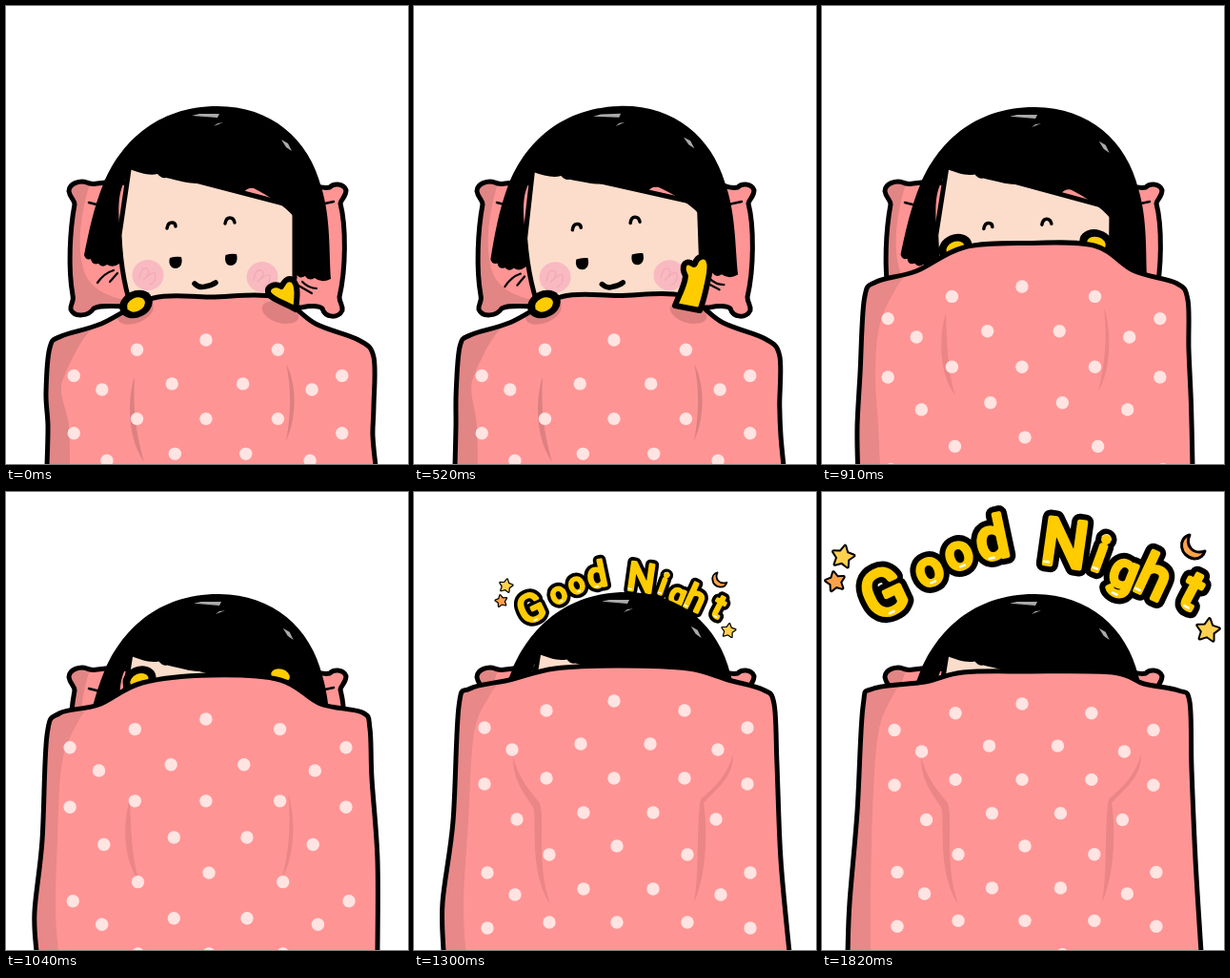
Recreate the animation shown at these times as an HTML page with a canvas. Size 422 by 480 pixels, loop 1.95 s.

```html
<!DOCTYPE html>
<html lang="en">
<head>
<meta charset="utf-8">
<title>Good Night</title>
<style>
html, body { margin: 0; width: 100%; height: 100%; overflow: hidden; background: #fff; }
canvas { display: block; width: 422px; height: 480px; }
</style>
</head>
<body>
<canvas id="stage" width="422" height="480"></canvas>
<script>
const ctx = document.getElementById('stage').getContext('2d');
const STEP = 130, STEPS = 15;
const PINK = '#ff9494', SHADE = '#e28585', YELLOW = '#ffcc00', SKIN = '#fcddcb';

const pillow = new Path2D('M104 185C97 186 90 188 85 185C78 182 66 186 66 194C67 201 72 203 72 208C67 235 65 275 70 303C72 309 67 313 68 318C72 327 87 325 92 317C100 313 115 315 130 315L310 316C320 314 328 314 332 317C335 327 349 328 353 319C354 314 350 311 350 305C357 275 357 230 351 207C352 202 357 200 357 193C354 185 343 186 340 190C335 191 330 190 325 188Z');
const pillowShade = new Path2D('M60 180L90 180C78 215 72 260 85 285C95 300 110 305 125 308L125 330L60 330Z');
const face = new Path2D('M130 165L303 210L303 285Q300 305 290 325L135 325Q121 290 119 240Z');
const hair = new Path2D('M82 261Q84 267 89 265Q90 272 97 270Q101 275 106 271Q112 275 119 270L122 262C121 240 115 212 121 192C124 183 128 177 130 171C141 175 150 178 159 176Q163 181 168 180C181 183 192 186 201 186Q206 181 210 185C222 190 237 192 250 195Q254 190 260 191C275 199 292 208 303 222C300 243 303 262 304 280Q308 287 314 283Q318 289 324 285Q331 291 341 286C339 258 341 222 331 190C318 139 278 105 222 105C157 105 119 145 102 187C92 212 87 236 82 261Z');
const shine = new Path2D('M195 115L203 113L224 113L222 117ZM218 126L222 123L228 122ZM289 140L296 144L300 152L294 148Z');

const HANDS = {
  half: new Path2D('M304 318C306 305 307 292 301 287C295 284 292 289 289 294C282 290 274 294 275 300C277 307 290 310 304 318Z'),
  up: new Path2D('M274 314C278 303 284 294 285 283C280 273 284 267 290 269C292 270 294 272 295 270C297 262 306 260 309 266C313 273 309 285 307 295C305 304 303 312 300 319Z')
};

// edge: blanket outline from bottom left to bottom right; dots: top, x scale, y scale, side sag
const low = {
  edge: [43,482, 44,440, 42,405, 46,358, 58,346, 100,333, 155,306, 215,305, 283,305, 325,333, 370,350, 386,368, 386,420, 385,450, 388,482],
  dots: [350, 1.02, 1.02, 9]
};
const mid = {
  edge: [32,482, 30,440, 38,365, 43,255, 56,232, 97,223, 143,200, 215,192, 288,197, 330,222, 374,231, 382,248, 384,300, 390,385, 390,482],
  dots: [238, 1.05, 1.06, 0]
};
const high = {
  edge: [31,482, 30,430, 41,345, 47,225, 59,206, 100,197, 148,185, 215,182, 288,185, 330,197, 366,207, 378,222, 381,285, 385,385, 394,482],
  dots: [219, 1, 1, 0]
};
const wide = {
  edge: [27,482, 29,430, 37,335, 43,225, 54,206, 108,199, 148,189, 215,188, 305,189, 338,201, 374,208, 386,220, 388,290, 392,385, 398,482],
  dots: [222, 0.985, 0.98, 0]
};

const FOLDS = {
  low: new Path2D('M135 388C128 410 126 450 145 478C137 450 133 425 135 388ZM294 375C305 395 306 430 294 456C299 430 300 400 294 375Z'),
  mid: new Path2D('M130 322C123 345 122 385 140 408C132 385 131 350 130 322ZM296 316C304 340 304 380 290 404C296 380 300 350 296 316Z'),
  high: new Path2D('M104 278C112 305 124 315 132 326C138 345 128 390 143 432C122 400 128 355 126 332C118 318 104 305 104 278ZM335 275C335 300 318 310 304 326C308 350 308 400 294 430C300 395 296 350 301 322C312 312 328 300 335 275Z')
};

// Dot rows: y followed by x offsets from the blanket's centre line
const DOT_ROWS = [
  [0, -2], [10, -73, 72], [28, -138, 138], [45, -37, 36], [51, -109, 107],
  [81, -73, -2, 72], [87, -138, 138], [117, -34, 39], [124, -104, 105], [152, 1],
  [161, -70, 75], [180, -135, 141], [197, -34, 39], [203, -106, 110],
  [232, -70, 1, 75], [238, -135, 141], [268, 41]
];

// letter, centre x, centre y, angle, size, gloss position
const LETTERS = [
  ['G', 64, 105, -25, 66, 0], ['o', 113, 84, -22, 49, 0], ['o', 144, 67, -20, 49, 0], ['d', 177, 48, -12, 60, -.1],
  ['N', 255, 53, 8, 68, -.42], ['i', 293, 64, 20, 51, 0], ['g', 314, 91, 22, 50, 0], ['h', 350, 88, 25, 60, -.4], ['t', 388, 104, 28, 56, .2]
];

const LEAN = [0, -1, -2, -2, -2, -1, .6];
const HEAD_Y = [0, 1, 2, 1, 0, 1, 2, 1, 2];
const WAVE = ['half', 'up', 'up', 'up', 'up', 'half', 'down'];

function mix(a, b, t) {
  const lerp = (p, q) => p.map((v, i) => v + (q[i] - v) * t);
  return { edge: lerp(a.edge, b.edge), dots: lerp(a.dots, b.dots) };
}

function blanketAt(k) {
  if (k < 7) return low;
  return [mix(low, mid, .5), mid, mix(mid, high, .6), high, mix(high, wide, .5), wide, mix(high, wide, .7), wide][k - 7];
}

function paint(path, fill, stroke, width) {
  if (fill) { ctx.fillStyle = fill; ctx.fill(path); }
  if (stroke) { ctx.strokeStyle = stroke; ctx.lineWidth = width; ctx.stroke(path); }
}

function line(d, width, color = '#000') {
  paint(new Path2D(d), null, color, width);
}

function ellipse(x, y, rx, ry, color, angle = 0) {
  ctx.beginPath();
  ctx.ellipse(x, y, rx, ry, angle, 0, Math.PI * 2);
  ctx.fillStyle = color;
  ctx.fill();
}

function clipped(path, draw) {
  ctx.save();
  ctx.clip(path);
  draw();
  ctx.restore();
}

function smooth(v) {
  const path = new Path2D(), n = v.length / 2;
  const at = i => { i = Math.max(0, Math.min(n - 1, i)); return [v[2 * i], v[2 * i + 1]]; };
  path.moveTo(...at(0));
  for (let i = 0; i < n - 1; i++) {
    const [a, b, c, d] = [at(i - 1), at(i), at(i + 1), at(i + 2)];
    path.bezierCurveTo(b[0] + (c[0] - a[0]) / 6, b[1] + (c[1] - a[1]) / 6,
      c[0] - (d[0] - b[0]) / 6, c[1] - (d[1] - b[1]) / 6, c[0], c[1]);
  }
  return path;
}

function star(x, y, r, color, turn) {
  const path = new Path2D();
  for (let i = 0; i < 10; i++) {
    const a = turn + i * Math.PI / 5, q = i % 2 ? r * .52 : r;
    path.lineTo(x + q * Math.sin(a), y - q * Math.cos(a));
  }
  path.closePath();
  paint(path, color, '#000', 4);
  paint(path, color);
}

function drawLetters(pass) {
  for (const [char, x, y, angle, size, gloss] of LETTERS) {
    ctx.save();
    ctx.translate(x, y);
    ctx.rotate(angle * Math.PI / 180);
    ctx.font = `${size}px Roboto, sans-serif`;
    const m = ctx.measureText(char);
    const w = m.actualBoundingBoxRight + m.actualBoundingBoxLeft;
    const h = m.actualBoundingBoxAscent + m.actualBoundingBoxDescent;
    const tx = (m.actualBoundingBoxLeft - m.actualBoundingBoxRight) / 2;
    const ty = (m.actualBoundingBoxAscent - m.actualBoundingBoxDescent) / 2;
    ctx.strokeStyle = ctx.fillStyle = pass ? YELLOW : '#000';
    ctx.lineWidth = pass ? 5 : 17;
    ctx.strokeText(char, tx, ty);
    ctx.fillText(char, tx, ty);
    if (pass) line(`M${gloss * w - 3} ${h / 2 - 2}l5 0`, 2.5, '#fff');
    ctx.restore();
  }
}

function drawGreeting(scale) {
  ctx.save();
  ctx.translate(213, 146);
  ctx.scale(scale, scale);
  ctx.translate(-213, -146);
  drawLetters(0);
  drawLetters(1);
  star(22, 68, 11.5, '#ffd050', .2);
  star(14, 94, 10, '#ffa24a', -.2);
  star(405, 145, 12, '#ffd050', .15);
  paint(new Path2D('M386 45C373 48 375 68 391 70C397 70 401 66 402 62C389 66 381 56 386 45Z'), '#ffa24a', '#000', 3);
  ctx.restore();
}

function drawPillow() {
  paint(pillow, PINK);
  clipped(pillow, () => paint(pillowShade, SHADE));
  paint(pillow, null, '#000', 5);
  line('M87 206L99 209M330 208L344 205', 2.5);
}

function drawCheek(x, y) {
  ellipse(x, y, 16.5, 16, '#f9b9c1');
  line(`M${x - 9} ${y + 3}q3 -14 9 -9q3 5 -5 11q14 -13 13 -3q-1 6 -6 8`, 1.2, '#f2a9b6');
}

function drawHead(lean, dy) {
  ctx.save();
  ctx.translate(215, 310 + dy);
  ctx.rotate(lean * Math.PI / 180);
  ctx.translate(-215, -310);
  paint(face, SKIN, '#000', 5);
  drawCheek(149, 282);
  drawCheek(269, 284);
  paint(hair, '#000');
  paint(shine, '#aaa');
  line('M169 233Q170 227 174 227Q178 227 178 231M230 228Q231 222 235 222Q239 222 240 227', 3.5);
  line('M198 291Q203 296 209 294Q216 293 220 290', 5.5);
  paint(new Path2D('M172 264Q178 262 184 263C186 270 183 275 178 275C173 275 170 270 172 264ZM230.500 261Q236 259 242 260C244 267 241 272 236 272C231 272 229 267 230.500 261Z'), '#000');
  line('M96 290Q103 280 113 277M109 289L117 280M311 289Q318 296 326 296M307 293L321 301', 2.2);
  ctx.restore();
}

function drawHand(x, y, angle) {
  ellipse(x, y, 18, 14, '#000', angle);
  ellipse(x, y + .5, 10, 7, YELLOW, angle);
}

function drawBlanket(pose, k, squeeze) {
  const edge = pose.edge.map((v, i) =>
    i > 3 && i < 26 ? v + (i % 2 ? -1.5 : (215 - v) * .013) * squeeze : v);
  const outline = smooth(edge);
  const [top, sx, sy, sag] = pose.dots;
  paint(outline, PINK);
  clipped(outline, () => {
    const p = i => [edge[2 * i], edge[2 * i + 1]];
    const [a, b, c, d, e] = [p(4), p(3), p(2), p(1), p(0)];
    const band = smooth([a[0] + 34, a[1] - 10, a[0] + 20, a[1] + 8, b[0] + 16, b[1] + 28,
      c[0] + 16, c[1], d[0] + 22, d[1], e[0] + 24, 490]);
    band.lineTo(0, 490);
    band.lineTo(0, a[1] - 20);
    paint(band, k < 7 ? SHADE : '#e88888');
    if (k < 7) {
      ellipse(136, 321, 20, 11, '#de8080', -.4);
      ellipse(288, 321, 20, 11, '#de8080', .3);
    }
    paint(k < 7 ? FOLDS.low : k < 9 ? FOLDS.mid : FOLDS.high, k < 7 ? '#dc8080' : '#eb8686');
    for (const [y, ...xs] of DOT_ROWS) {
      for (const x of xs) {
        ellipse(212 + x * sx, top + y * sy + (Math.abs(x) > 130 ? sag : 0), 6.7, 6.7, '#ffe4e2');
      }
    }
  });
  paint(outline, null, '#000', 5);
}

function draw(time) {
  const k = Math.floor(time / STEP) % STEPS;
  const lean = LEAN[Math.min(k, 6)];
  const pose = blanketAt(k);
  ctx.fillStyle = '#fff';
  ctx.fillRect(0, 0, 422, 480);
  ctx.lineJoin = ctx.lineCap = 'round';

  if (k >= 10) drawGreeting(k === 10 ? .61 : k === 11 ? 1.02 : 1);
  drawPillow();
  drawHead(lean, k < 6 ? 0 : HEAD_Y[k - 6]);
  if (k === 7 || k === 8) {
    const y = pose.edge[15];
    drawHand(140, y + 5, -.4);
    drawHand(288, y, .3);
  }
  drawBlanket(pose, k, Math.max(0, -lean) / 2);
  if (k < 7) {
    drawHand(136.5, 312.5, -.45);
    if (WAVE[k] === 'down') drawHand(287.5, 313.5, .35);
    else paint(HANDS[WAVE[k]], YELLOW, '#000', 6);
  }
}

function tick() {
  draw(performance.now() % (STEP * STEPS));
  requestAnimationFrame(tick);
}
tick();
</script>
</body>
</html>
```
